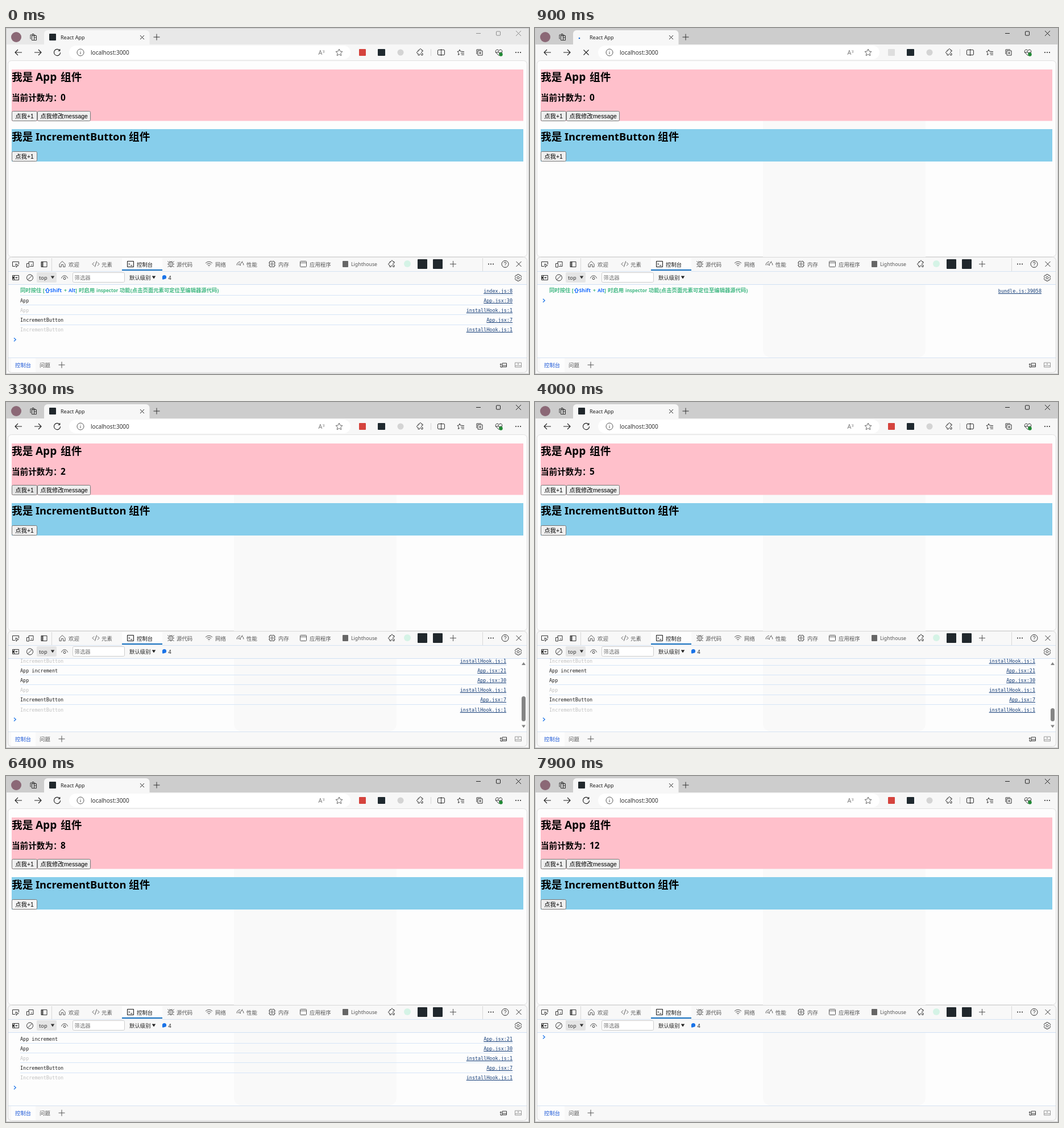
Animation of 920 by 609 pixels, one loop 8000 ms. Source, as an HTML page with a canvas:

```html
<!DOCTYPE html>
<html lang="zh-CN">
<head>
<meta charset="utf-8">
<style>
html, body { margin: 0; width: 100%; height: 100%; overflow: hidden; background: #f7f7f7; }
canvas { display: block; }
</style>
</head>
<body>
<canvas id="stage" width="920" height="609"></canvas>
<script>
const ctx = document.getElementById('stage').getContext('2d');
const LOOP = 8000, ROW = 17.2;
const UI = '"Noto Sans", "Noto Sans CJK SC", "Noto Sans CJK", sans-serif';
const ARIAL = '"Liberation Sans", "Noto Sans CJK SC", "Noto Sans CJK", sans-serif';
const MONO = '"DejaVu Sans Mono", monospace';
const APP_CLICKS = [2900, 3300, 3500, 3700, 3900, 4100, 4200];
const CHILD_CLICKS = [6000, 6500, 6700, 6900, 7100];
const RELOAD = 900, LOADED = 1000, CLEAR_1 = 5400, CLEAR_2 = 7700;

const ICONS = {
  close: 'M-3.5-3.5L3.5 3.5M3.5-3.5L-3.5 3.5',
  closeBig: 'M-4.5-4.5L4.5 4.5M4.5-4.5L-4.5 4.5',
  plus: 'M-5.5 0H5.5M0-5.5V5.5',
  minimize: 'M-4 0H4',
  maximize: 'M-2.5-3.5H2.5Q3.5-3.5 3.5-2.5V2.5Q3.5 3.5 2.5 3.5H-2.5Q-3.5 3.5-3.5 2.5V-2.5Q-3.5-3.5-2.5-3.5Z',
  back: 'M6 0H-6M-1-5L-6 0L-1 5',
  forward: 'M-6 0H6M1-5L6 0L1 5',
  reload: 'M4.3-3.6A5.6 5.6 0 1 0 5.6 0M4.8-6V-2.8H1.6',
  info: 'M6 0A6 6 0 1 1-6 0A6 6 0 1 1 6 0M0-.8V3M0-3V-2.2',
  star: 'M0-6L1.8-2L6-1.6L2.8 1.3L3.7 5.6L0 3.4L-3.7 5.6L-2.8 1.3L-6-1.6L-1.8-2Z',
  puzzle: 'M-4-4H-1.7A1.8 1.8 0 1 1 1.7-4H4V-1.6A1.8 1.8 0 1 0 4 1.8V4.8H1.6A1.7 1.7 0 1 0-1.6 4.8H-4V1.8A1.8 1.8 0 1 1-4-1.6Z',
  split: 'M-4.5-4.5H4.5Q6-4.5 6-3V3Q6 4.5 4.5 4.5H-4.5Q-6 4.5-6 3V-3Q-6-4.5-4.5-4.5M0-6V6',
  favorites: 'M-2-5L-.7-2L2.5-1.7M-2-5L-3.3-2L-6-1.6L-3.7 .8L-4.5 4.5L-2 3M2-1.5H6M0 1.2H6M1 4H6',
  stack: 'M-3-3H5V5H-3ZM-5 3V-5H3M1-1V3M-1 1H3',
  heart: 'M0 5.5L-5 .5C-8-4-2-7 0-3C2-7 8-4 5 .5ZM-6 0H-2L-1-2L1 2L2 0H5',
  workspaces: 'M-2.5-2.5H5.5V5.5H-2.5ZM-4 3H-5V-4H3V-3M-2-5.5H1M1.5-2V5M1.5 1H5',
  inspect: 'M-1 3.5H-5.5V-4.5H5.5V0M0-1L5 2L2.5 3L1.2 5.3Z',
  device: 'M-2-1V-4.5H6V3.5H0M-5.5-1.5H-1.5V5H-5.5ZM2 1H4',
  dock: 'M-5-4.5H5V4.5H-5ZM-4-4.5V4.5M-3-4.5V4.5M-2-4.5V4.5',
  home: 'M-5 0L0-5L5 0V5H1.7V1H-1.7V5H-5Z',
  code: 'M-3-3L-6 0L-3 3M3-3L6 0L3 3M1.6-5L-1.6 5',
  terminal: 'M-5.5-5H5.5V5H-5.5ZM-3.5-2L-1.5 0L-3.5 2M0 2.5H3.5',
  bug: 'M-3-1A3 3 0 0 1 3-1V2A3 3 0 0 1-3 2ZM0-3V5M-3 0H-6M3 0H6M-3-2L-5.5-5M3-2L5.5-5M-3 3L-5.5 5.5M3 3L5.5 5.5M-1.5-3.5L-2-5.5M1.5-3.5L2-5.5',
  wifi: 'M-6-1.6Q0-7 6-1.6M-4 .7Q0-3 4 .7M-2 2.7Q0 1 2 2.7M-.4 4.4H.4',
  gauge: 'M-6 2A6 6 0 0 1 0-4M3-3.6A6 6 0 0 1 6 2M-1 2L4-5M-3.5 2A3 3 0 0 1-1-.8M-1 2H1',
  chip: 'M-4.5-4.5H4.5V4.5H-4.5ZM-1.7-1.7H1.7V1.7H-1.7ZM-2-6V-4.5M2-6V-4.5M-2 6V4.5M2 6V4.5M-6-2H-4.5M-6 2H-4.5M6-2H4.5M6 2H4.5',
  window: 'M-4.5-5H4.5Q5.5-5 5.5-4V4Q5.5 5 4.5 5H-4.5Q-5.5 5-5.5 4V-4Q-5.5-5-4.5-5M-5.5-2.3H5.5',
  help: 'M6 0A6 6 0 1 1-6 0A6 6 0 1 1 6 0M-1.8-1.5C-1.8-4 2-4 1.8-1.5C1.7 0 0 0 0 1.5M0 3V3.7',
  sidebar: 'M-5.5-4H5.5V4H-5.5ZM-2.3-4V4M3.5 0H0M1.5-1.5L0 0L1.5 1.5M-4.5-2V2M-3.5-2V2',
  clear: 'M5.5 0A5.5 5.5 0 1 1-5.5 0A5.5 5.5 0 1 1 5.5 0M3.9-3.9L-3.9 3.9',
  eye: 'M-5.5 1Q-4-3.5 0-3.5Q4-3.5 5.5 1M2 1.2A2 2 0 1 1-2 1.2A2 2 0 1 1 2 1.2',
  gear: 'M2 0A2 2 0 1 1-2 0A2 2 0 1 1 2 0M-1.5-5.8H1.5L2-4L4-4.5L5.7-1.8L4.4 0L5.7 1.8L4 4.5L2 4L1.5 5.8H-1.5L-2 4L-4 4.5L-5.7 1.8L-4.4 0L-5.7-1.8L-4-4.5L-2-4Z',
  shift: 'M0-4L3.6-.3H1.7V3.6H-1.7V-.3H-3.6Z',
  tray: 'M-5.5-4H5.5V4H-5.5ZM-5.5 1.5H5.5M0-2.5V0M-1.3-1.2L0-2.5L1.3-1.2',
  drawer: 'M-2-3H5.5V3.5H-2ZM-2 1H5.5M-3-1H-6M-4.5-2.5L-6-1L-4.5 .5M-5 1V4H-2'
};
for (const key in ICONS) ICONS[key] = new Path2D(ICONS[key]);

function rect(x, y, w, h, fill) {
  ctx.fillStyle = fill;
  ctx.fillRect(x, y, w, h);
}

function box(x, y, w, h, r, fill, stroke) {
  ctx.beginPath();
  ctx.roundRect(x, y, w, h, r);
  if (fill) { ctx.fillStyle = fill; ctx.fill(); }
  if (stroke) { ctx.strokeStyle = stroke; ctx.lineWidth = 1; ctx.stroke(); }
}

function disc(x, y, r, fill) {
  ctx.beginPath();
  ctx.arc(x, y, r, 0, 7);
  ctx.fillStyle = fill;
  ctx.fill();
}

function text(str, x, y, size, color = '#1f1f1f', { family = UI, weight = 400, align = 'left' } = {}) {
  ctx.font = `${weight} ${size}px ${family}`;
  ctx.textAlign = align;
  ctx.fillStyle = color;
  ctx.fillText(str, x, y);
}

function icon(name, x, y, color = '#333', width = 1) {
  ctx.save();
  ctx.translate(x, y);
  ctx.strokeStyle = color;
  ctx.lineWidth = width;
  ctx.lineJoin = 'round';
  ctx.stroke(ICONS[name]);
  ctx.restore();
}

function dots(x, y) {
  for (const dx of [-4, 0, 4]) disc(x + dx, y, 1, '#222');
}

function triangle(x, y, w, h, color) {
  ctx.beginPath();
  ctx.moveTo(x - w / 2, y - h / 2);
  ctx.lineTo(x + w / 2, y - h / 2);
  ctx.lineTo(x, y + h / 2);
  ctx.fillStyle = color;
  ctx.fill();
}

const countUntil = (list, t) => list.filter(c => c <= t).length;
const within = (t, from, to) => t >= from && t < to;

function buttonColor(t, clicks, hovers) {
  if (clicks.some(c => within(t, c - 100, c))) return '#f6f6f6';
  return hovers.some(([a, b]) => within(t, a, b)) ? '#e4e4e4' : '#efefef';
}

function logRows(t) {
  const render = [
    ['App', 'App.jsx:30'],
    ['App', 'installHook.js:1', true],
    ['IncrementButton', 'App.jsx:7'],
    ['IncrementButton', 'installHook.js:1', true]
  ];
  const click = [['App increment', 'App.jsx:21'], ...render];
  const repeat = n => Array.from({ length: n }, () => click).flat();
  if (within(t, RELOAD, LOADED)) return [['', 'bundle.js:39058']];
  if (t < CLEAR_1) return [['', 'index.js:8'], ...render, ...repeat(countUntil(APP_CLICKS, t))];
  return t < CLEAR_2 ? repeat(countUntil(CHILD_CLICKS, t)) : [];
}

function drawBrowser(t, loading) {
  const active = Math.min(1, Math.max(0, (Math.floor(t / 100) - 2) / 3));
  const shade = Math.round(232 - 27 * active);
  const control = active ? '#222' : '#8c8c8c';
  rect(0, 0, 920, 609, '#f7f7f7');
  rect(0, 0, 920, 29, `rgb(${shade},${shade},${shade})`);
  disc(18, 16, 9, '#8b6876');
  icon('workspaces', 48, 16);
  box(67, 4, 185.5, 30, [6, 6, 0, 0], '#f7f7f7');
  rect(0, 29, 920, 28, '#f7f7f7');
  if (loading) disc(78, 18, 1.3, '#1769d2');
  else box(76, 10, 12, 12, 1, '#20272c');
  text('React App', 96, 19.5, 9);
  icon('close', 239.5, 16.5, '#222');
  icon('plus', 265, 16);
  icon('minimize', 831, 9.5, control);
  icon('maximize', 866, 9.5, control);
  icon('closeBig', 901.5, 9.5, control);

  icon('back', 22, 43, '#222', 1.1);
  icon('forward', 56, 43, '#222', 1.1);
  icon(loading ? 'closeBig' : 'reload', 90, 43, '#222', 1.1);
  box(111, 31, 495, 24, 12, '#fff');
  icon('info', 131, 43, '#555');
  text('localhost:3000', 149, 46.5, 10, '#333');
  text('A', 549.5, 47, 10.5, '#777');
  text('))', 557, 43, 6, '#777');
  icon('star', 586, 43, '#666');
  box(621, 37, 12, 12, 1, loading ? '#dedede' : '#d5433d');
  box(654, 37, 13, 12, 1, '#1f292f');
  disc(694, 43, 5.5, '#d4d4d4');
  icon('puzzle', 729, 43);
  rect(747, 37, 1, 12, '#d5d5d5');
  icon('split', 765.5, 43);
  icon('favorites', 800, 43);
  icon('stack', 833, 43);
  icon('heart', 867, 43);
  disc(870.5, 46.5, 3.2, '#218a35');
  dots(901, 43);
}

function drawPage(t, ghost) {
  box(3.5, 57.5, 913, 345, 6, '#fdfdfd', '#e0e0e0');
  if (ghost) rect(401, 163, 286, 240, '#f9f9f9');
  rect(10, 73, 900, 90.5, '#ffc0cb');
  rect(10, 178, 900, 57, '#87ceeb');
  const bold = { weight: 700 };
  const heading = (y, name, end, size) => {
    text('我是', 10, y, 18.7, '#000', bold);
    text(name, 52, y, size, '#000', bold);
    text('组件', end, y, 18.7, '#000', bold);
  };
  heading(92.5, 'App', 96, 19);
  heading(197.5, 'IncrementButton', 216, 18.3);
  text('当前计数为：', 10, 128, 14.6, '#000', bold);
  const total = countUntil(APP_CLICKS, t) + countUntil(CHILD_CLICKS, t);
  text(String(total), 96, 128, 15.4, '#000', bold);

  const button = (x, y, w, label, fill) => {
    box(x + .5, y + .5, w - 1, 17, 2, fill, '#767676');
    text(label, x + w / 2, y + 13, 10.4, '#000', { family: ARIAL, align: 'center' });
  };
  button(10, 146, 45, '点我+1', buttonColor(t, APP_CLICKS, [[1700, 4500]]));
  button(55, 146, 94, '点我修改message', '#efefef');
  button(10, 217, 45, '点我+1', buttonColor(t, CHILD_CLICKS, [[4500, 4600], [5800, 7100]]));
}

function drawToolbars(t) {
  box(3.5, 403.5, 913, 203, 6, '#f8f8f8', '#d9d9d9');
  rect(204, 405, 71, 22, '#fdfdfd');
  rect(204, 425, 71, 2, '#0f6cbd');
  rect(4, 428, 912, 1, '#d5e2f2');
  rect(4, 451, 912, 1, '#cfe0f5');
  if (within(t, 5100, 5200)) box(32, 406, 21, 20, 3, '#e3e3e3');
  if (within(t, 5200, 5500) || within(t, 7500, 7900)) box(33, 432, 20, 16, 3, '#e3e3e3');

  icon('inspect', 17, 416);
  icon('device', 42, 416);
  icon('dock', 67, 416);
  rect(80, 405, 1, 23, '#d8d8d8');
  const tabs = [
    ['home', 99, '欢迎', 110], ['code', 158, '元素', 168], ['terminal', 219, '控制台', 230],
    ['bug', 290, '源代码', 300], ['wifi', 357, '网络', 368], ['gauge', 412, '性能', 423],
    ['chip', 468, '内存', 479], ['window', 523, '应用程序', 534]
  ];
  for (const [name, x, label, labelX] of tabs) {
    const color = name === 'terminal' ? '#111' : '#555';
    icon(name, x, 415.5, color);
    text(label, labelX, 419.5, 9.4, color);
  }
  box(592, 410, 10, 11, 1, '#666');
  text('Lighthouse', 607, 419, 8.75, '#555');
  icon('puzzle', 679, 415.5);
  disc(706, 415, 6, '#d5f3e6');
  box(724, 407, 17, 17, 1, '#20272c');
  box(751, 407, 17, 17, 1, '#20272c');
  icon('plus', 786.5, 415.5, '#555');
  rect(838, 405, 1, 23, '#d8d8d8');
  dots(853, 415.5);
  icon('help', 878, 415.5);
  icon('closeBig', 902, 415.5);

  icon('sidebar', 17, 439.5);
  icon('clear', 42, 439.5);
  box(54, 430, 35, 18, 2, '#e5e5e5');
  text('top', 58, 443, 9.2, '#333');
  triangle(82, 439, 6.5, 5, '#333');
  icon('eye', 103, 439.5, '#444');
  box(117.5, 430.5, 91, 17, 2, '#fff', '#cdcdcd');
  text('筛选器', 120.5, 443, 9.4, '#757575');
  text('默认级别', 217, 443, 9.4, '#222');
  triangle(260, 439, 6.5, 5, '#222');
  if (!within(t, RELOAD, 1300)) {
    disc(278.5, 438.5, 3.6, '#1a73e8');
    rect(275, 439, 3, 3.5, '#1a73e8');
    text('4', 285.5, 442.5, 9, '#222');
  }
  icon('gear', 901, 439.5, '#444');
}

function drawHint(y) {
  const green = '#41b883', blue = '#1a6dff', bold = { weight: 700 };
  const parts = [
    ['同时按住 [', 25, green, 9.36], ['Shift', 77.5, blue, 8.8],
    ['+', 102, green, 8.5], ['Alt', 110, blue, 8.5], [']', 122, green, 8.8],
    ['时启用', 128, green, 9.36], ['inspector', 159, green, 8.1],
    ['功能(点击页面元素可定位至编辑器源代码)', 200, green, 9.36]
  ];
  for (const [str, x, color, size] of parts) text(str, x, y, size, color, bold);
  icon('shift', 73, y - 3.2, blue, 1.2);
}

function drawPrompt(y) {
  ctx.beginPath();
  ctx.moveTo(14, y - 3);
  ctx.lineTo(17.3, y);
  ctx.lineTo(14, y + 3);
  ctx.strokeStyle = '#1a73e8';
  ctx.lineWidth = 1.2;
  ctx.stroke();
}

function drawScrollbar(count) {
  const view = 129, track = 96, end = 562;
  const thumb = Math.max(18, track * view / ((count + 1) * ROW + 7));
  triangle(910.5, 460.5, 7, -5, '#858585');
  triangle(910.5, 571, 7, 5, '#858585');
  box(907, end - thumb, 7, thumb, 3.5, '#858585');
}

function drawConsole(t, ghost) {
  const rows = logRows(t), scrolled = rows.length > 6;
  const right = scrolled ? 880 : 891;
  const promptY = scrolled ? 558.7 : rows.length ? 462.5 + rows.length * ROW : 459.5;
  rect(4, 452, 912, 128, '#fdfdfd');
  if (ghost) box(401, 452, 286, 128, [0, 0, 14, 14], '#f9f9f9');
  ctx.save();
  ctx.beginPath();
  ctx.rect(4, 452, 912, 128);
  ctx.clip();
  rows.forEach(([label, link, dim], i) => {
    const y = promptY - (rows.length - i) * ROW;
    if (y < 440) return;
    if (i < rows.length - 1) rect(25, Math.floor(y + 8), right - 24, 1, '#d5e5f8');
    if (label) text(label, 25, y + 3, 8.45, dim ? '#c2c2c2' : '#1f1f1f', { family: MONO });
    else drawHint(y + 2.8);
    text(link, right, y + 3, 8.45, '#143d78', { family: MONO, align: 'right' });
    const width = ctx.measureText(link).width;
    rect(right - width, Math.round(y + 4), width, 1, '#143d78');
  });
  drawPrompt(promptY);
  if (scrolled) drawScrollbar(rows.length);
  ctx.restore();
}

function drawFooter() {
  rect(4, 580, 912, 1, '#d5e2f2');
  rect(9, 581, 43, 25, '#fdfdfd');
  text('控制台', 16, 597, 9.4, '#1a56d6');
  text('问题', 59, 597, 9.4, '#555');
  icon('plus', 98, 593, '#555');
  icon('drawer', 875, 593);
  icon('tray', 901, 593, '#999');
  ctx.strokeStyle = '#c9c9c9';
  ctx.lineWidth = 1;
  ctx.strokeRect(.5, .5, 919, 608);
}

function draw(t) {
  const ghost = t >= 300;
  drawBrowser(t, within(t, RELOAD, LOADED));
  drawPage(t, ghost);
  drawToolbars(t);
  drawConsole(t, ghost);
  drawFooter();
}

const start = performance.now();
function tick() {
  draw((performance.now() - start) % LOOP);
  requestAnimationFrame(tick);
}
tick();
</script>
</body>
</html>
```
